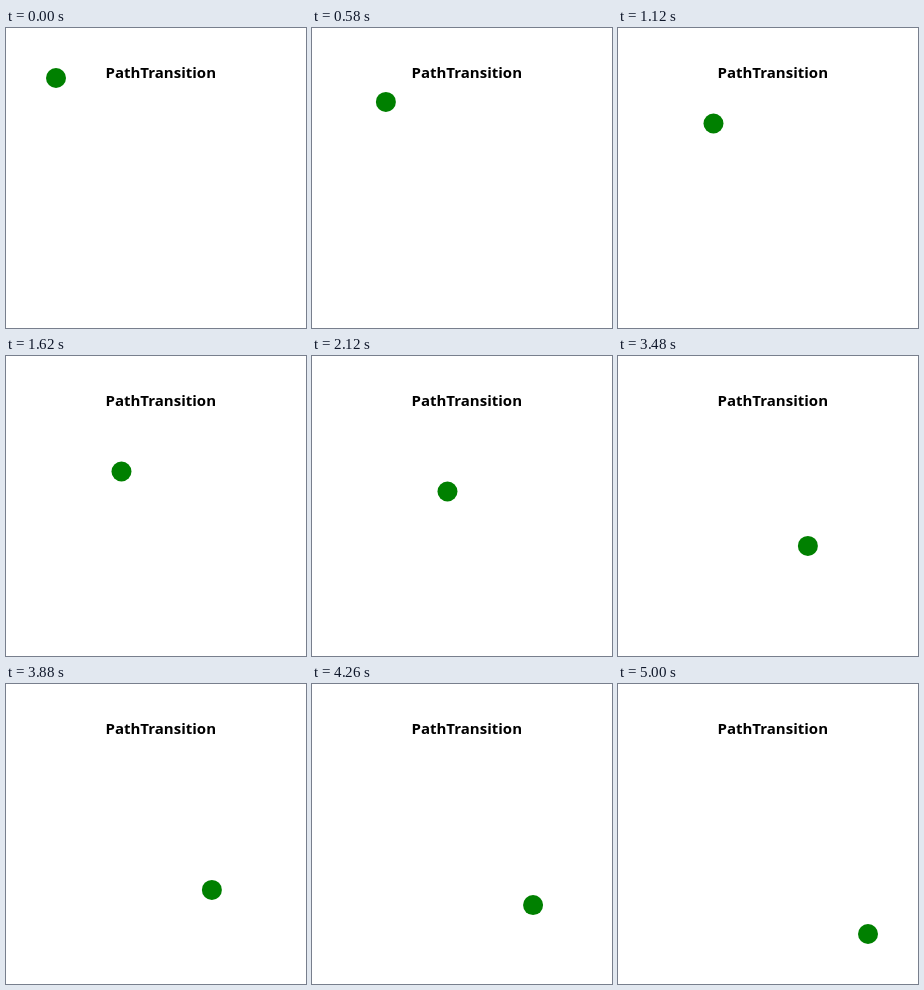
An HTML page for the animation above (6000 ms loop, 300x300 px).

```html
<!DOCTYPE html>
<html lang="en">
<head>
<meta charset="utf-8">
<title>PathTransition</title>
<style>
  html, body { margin: 0; width: 100%; height: 100%; overflow: hidden; background: #fff; }
  svg { display: block; width: 100%; height: 100%; }
  text { font: bold 15px "Open Sans", "Noto Sans", sans-serif; }
</style>
</head>
<body>
<svg viewBox="0 0 300 300">
  <text x="99.5" y="50">PathTransition</text>
  <circle id="ball" cx="50" cy="50" r="10" fill="green"/>
</svg>
<script>
  const LOOP = 6000, STEP = 20, LEAD = 17;
  const START = 50, END = 250, SPEED = 0.04;
  const ball = document.getElementById("ball");
  const begin = performance.now();

  function draw(now) {
    const elapsed = Math.max(0, now - begin) % LOOP;
    const t = Math.floor(elapsed / STEP) * STEP;
    const pos = t ? Math.min(END, START + SPEED * (t + LEAD)) : START;
    ball.setAttribute("cx", pos);
    ball.setAttribute("cy", pos);
    requestAnimationFrame(draw);
  }
  requestAnimationFrame(draw);
</script>
</body>
</html>
```
